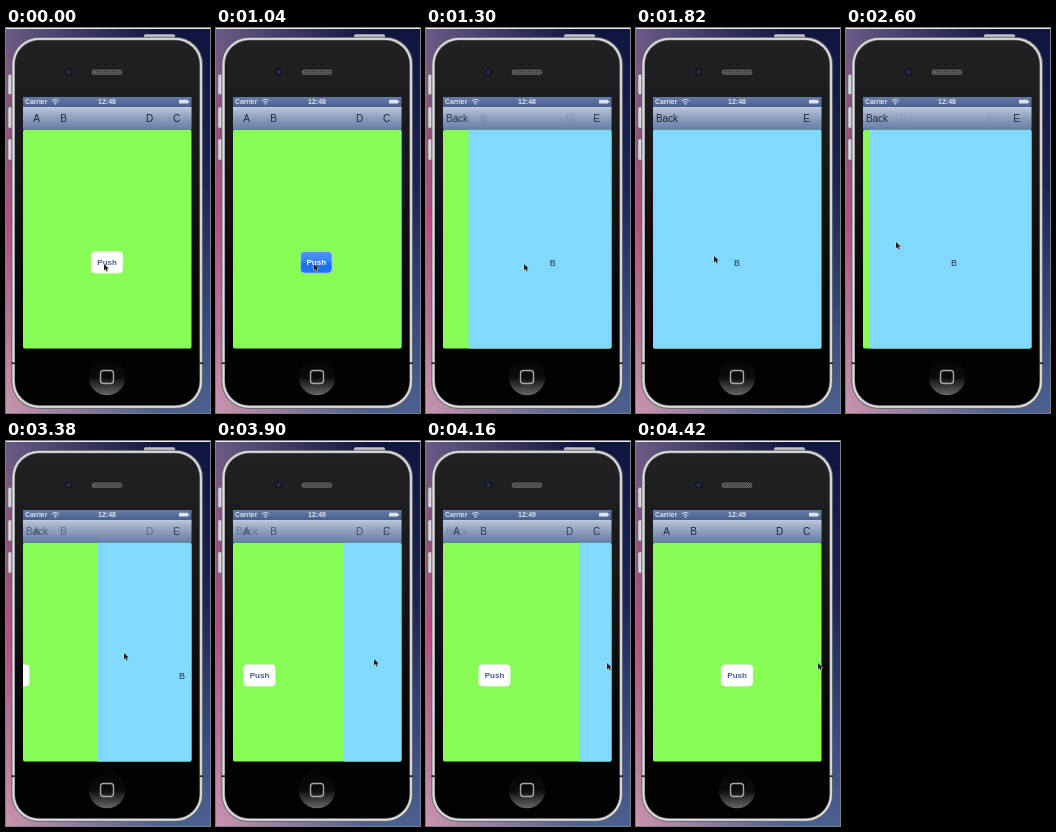
An HTML page with a canvas that plays this animation: 204 px wide and 385 px high, repeating every 4.94 s.

```html
<!DOCTYPE html>
<html lang="en">
<head>
<meta charset="utf-8">
<title>Swipe back</title>
<style>
html, body { margin: 0; width: 100%; height: 100%; overflow: hidden; background: #2b2f5c; }
canvas { display: block; width: 204px; height: 385px; }
</style>
</head>
<body>
<canvas id="stage"></canvas>
<script>
const W = 204, H = 385, LOOP = 4940, STEP = 130;
const SCREEN = { x: 17, y: 69, w: 168.6, h: 251.7 };
const PAGE_Y = 101.6;
const SANS = '"Liberation Sans", Arial, sans-serif';
const canvas = document.getElementById('stage');
const ctx = canvas.getContext('2d');
const dpr = window.devicePixelRatio || 1;
canvas.width = W * dpr;
canvas.height = H * dpr;
ctx.scale(dpr, dpr);

const clamp = (v, a, b) => Math.min(b, Math.max(a, v));
const smooth = p => p * p * (3 - 2 * p);

function gradient(x0, y0, x1, y1, ...stops) {
  const g = ctx.createLinearGradient(x0, y0, x1, y1);
  stops.forEach(([p, c]) => g.addColorStop(p, c));
  return g;
}

function rect(x, y, w, h, fill) {
  ctx.fillStyle = fill;
  ctx.fillRect(x, y, w, h);
}

function round(x, y, w, h, r, fill, stroke, line = 1) {
  ctx.beginPath();
  ctx.roundRect(x, y, w, h, r);
  if (fill) { ctx.fillStyle = fill; ctx.fill(); }
  if (stroke) { ctx.strokeStyle = stroke; ctx.lineWidth = line; ctx.stroke(); }
}

function disc(x, y, r, fill) {
  ctx.beginPath();
  ctx.arc(x, y, r, 0, Math.PI * 2);
  ctx.fillStyle = fill;
  ctx.fill();
}

function text(str, x, y, size, color, { weight = '', align = 'center', alpha = 1 } = {}) {
  ctx.globalAlpha = alpha;
  ctx.font = `${weight} ${size}px ${SANS}`;
  ctx.textAlign = align;
  ctx.fillStyle = color;
  ctx.fillText(str, x, y);
  ctx.globalAlpha = 1;
}

// Linear interpolation through [time, ...values] rows
function along(rows, t) {
  const i = rows.findIndex(r => r[0] >= t);
  if (i < 0) return rows.at(-1).slice(1);
  const b = rows[i], a = rows[i - 1] || b;
  const p = a === b ? 0 : (t - a[0]) / (b[0] - a[0]);
  return a.slice(1).map((v, k) => v + (b[k + 1] - v) * p);
}

// Time, pointer x, pointer y, how far the page is dragged
const PATH = [
  [0, 98, 236, 0], [1560, 98, 236, 0], [1820, 78, 228, 0], [2080, 44, 217, 0],
  [2210, 37, 215, 0], [2470, 40, 214, 0], [2600, 50, 214, 7], [3380, 118, 212, 75],
  [3900, 158, 218, 111], [4160, 181, 222, 136], [4420, 182, 222, 136]
];
const PUSH = 1025, PUSH_TIME = 365, DRAG = 2210, RELEASE = 4160;

// Left edge of the upper page, measured from the screen's left
function pageOffset(t) {
  if (t < DRAG) return SCREEN.w * (1 - smooth(clamp((t - PUSH) / PUSH_TIME, 0, 1)));
  const dragged = along(PATH, t)[2];
  const p = clamp((t - RELEASE) / 240, 0, 1);
  return dragged + (SCREEN.w - dragged) * (1 - (1 - p) ** 2);
}

function backdrop() {
  rect(0, 0, W, H, gradient(0, 0, 0, H,
    [0, '#655a86'], [0.25, '#94527f'], [0.5, '#b3507f'], [0.8, '#bd7799'], [1, '#c994ae']));
  ctx.save();
  ctx.globalCompositeOperation = 'source-over';
  const night = gradient(0, 0, 0, H, [0, '#10153f'], [0.4, '#1a2453'], [0.8, '#3b4f80'], [1, '#4d6190']);
  for (let x = 0; x < W; x += 4) {
    ctx.globalAlpha = clamp(x / 150, 0, 1);
    rect(x, 0, 4, H, night);
  }
  ctx.restore();
  rect(0, 0, W, 1, '#eeeef2');
}

function phone() {
  const shell = [9, 12.3, 184.5, 365, 24];
  round(138, 6.3, 31, 5, 1.5, '#c2c3c7');
  [[46.5, 20], [79, 21], [111, 21]].forEach(([y, h]) => round(2, y, 5, h, 1.5, '#d6d7db', '#66666c', 0.5));
  round(5.7, 9.2, 191, 371.3, 27, '#8e8f92', '#55555a', 0.6);
  round(7.4, 10.8, 187.6, 368, 25.5, null, '#dcdddf', 1.8);
  round(...shell, gradient(0, 12, 0, 340, [0, '#222225'], [0.3, '#19191b'], [0.8, '#060607'], [1, '#020202']));

  [5.5, 193].forEach(x => rect(x, 334.3, 4, 1.8, '#252528'));
  disc(62.5, 44, 3.8, '#15161f');
  disc(62.5, 44, 2, '#27305f');
  round(85, 41, 32, 6.5, 3.2, '#5b5b5d', '#161618', 0.8);
  for (let x = 88; x < 115; x += 2) {
    for (let y = 43; y < 47; y += 2) rect(x, y, 1, 1, '#343436');
  }
  disc(101, 349, 18.3, gradient(0, 330, 0, 368,
    [0, '#040404'], [0.52, '#0c0c0d'], [0.62, '#222224'], [1, '#6a6a6c']));
  round(94.5, 342.5, 13, 13, 3, null, '#a8a8aa', 1.4);
}

function statusBar(clock) {
  const ink = '#dce4f0';
  rect(SCREEN.x, 69, SCREEN.w, 10, gradient(0, 69, 0, 79, [0, '#657ba6'], [1, '#49618f']));
  text('Carrier', 19, 76.3, 6.8, ink, { weight: 'bold', align: 'left' });
  text(clock, 101, 76.3, 7, ink, { weight: 'bold' });
  ctx.strokeStyle = ink;
  ctx.lineWidth = 1;
  [2.4, 4.6].forEach(r => {
    ctx.beginPath();
    ctx.arc(49.5, 76, r, -Math.PI * 0.8, -Math.PI * 0.2);
    ctx.stroke();
  });
  disc(49.5, 75.8, 0.9, ink);
  round(173, 71.8, 9, 3.8, 0.6, ink);
  rect(182, 73, 1.2, 1.5, ink);
}

function navBar(under) {
  rect(SCREEN.x, 79, SCREEN.w, 23, gradient(0, 79, 0, 102,
    [0, '#c4cddd'], [0.08, '#b3bfd4'], [0.5, '#8c9dbd'], [0.94, '#6a80a8'], [1, '#465a80']));
  const ink = '#1f2838', y = 93.5;
  [['A', 30.5], ['B', 57.5], ['D', 143.5], ['C', 170.5]]
    .forEach(([s, x]) => text(s, x, y, 10, ink, { alpha: under }));
  text('Back', 31, y, 10, ink, { alpha: 1 - under });
  text('E', 170.5, y, 10, ink, { alpha: 1 - under });
}

function pushButton(x, pressed) {
  const y = 223.4, w = 31.8, h = 21.8;
  if (pressed) {
    round(x, y, w, h, 4, gradient(0, y, 0, y + h,
      [0, '#4d96fd'], [0.5, '#3383fb'], [0.55, '#1c6cf3'], [1, '#2775f6']), '#a6d3dc', 1);
  } else {
    round(x, y, w, h, 4, '#fff', '#d2e6c8', 0.6);
  }
  text('Push', x + w / 2, 237, 8, pressed ? '#fff' : '#465c8e', { weight: 'bold' });
}

function pages(offset, pressed) {
  const edge = SCREEN.x + offset, h = SCREEN.y + SCREEN.h - PAGE_Y;
  ctx.save();
  ctx.beginPath();
  ctx.roundRect(SCREEN.x, PAGE_Y, SCREEN.w, h, 2);
  ctx.clip();
  rect(SCREEN.x, PAGE_Y, SCREEN.w, h, '#88fd55');
  pushButton(85.2 + offset - SCREEN.w, pressed);
  rect(edge, PAGE_Y, SCREEN.w, h, '#81d9fd');
  text('B', edge + 84, 238, 9, '#26323c');
  ctx.restore();
}

function pointer(x, y) {
  ctx.beginPath();
  [[0, 0], [0, 6.4], [1.5, 5.1], [2.6, 7.4], [3.7, 6.9], [2.7, 4.7], [4.7, 4.6]]
    .forEach(([dx, dy]) => ctx.lineTo(x + dx, y + dy));
  ctx.closePath();
  ctx.lineJoin = 'round';
  ctx.strokeStyle = '#e8e8e8';
  ctx.lineWidth = 1;
  ctx.stroke();
  ctx.fillStyle = '#1c1c1e';
  ctx.fill();
}

function draw(now) {
  const t = Math.floor((now % LOOP) / STEP) * STEP;
  const offset = pageOffset(t);
  const [x, y] = along(PATH, t);
  backdrop();
  phone();
  rect(SCREEN.x, SCREEN.y, SCREEN.w, SCREEN.h, '#000');
  statusBar(t < 3900 ? '12:48' : '12:49');
  navBar(offset / SCREEN.w);
  pages(offset, t > PUSH && t < DRAG);
  pointer(x, y);
}

let start;
function tick(now) {
  start ??= now;
  draw(now - start);
  requestAnimationFrame(tick);
}
draw(0);
requestAnimationFrame(tick);
</script>
</body>
</html>
```
